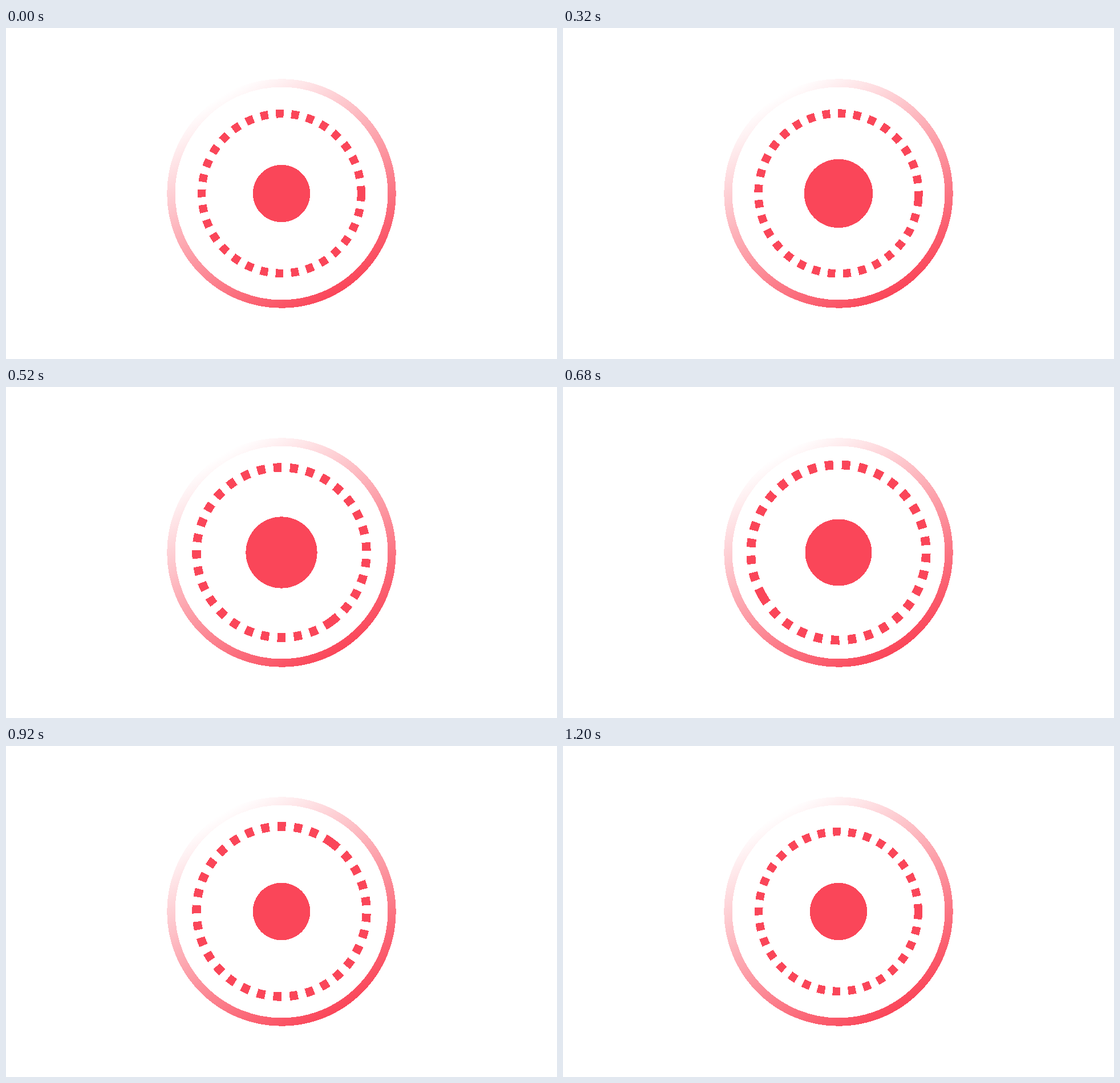
Recreate the animation shown at these times as an HTML page. Size 966 by 580 pixels, loop 6000 ms.

```html
<!DOCTYPE html>
<html lang="en">
<head>
<meta charset="utf-8">
<title>Pulse dial</title>
<style>
  html, body { margin: 0; width: 100%; height: 100%; overflow: hidden; background: #fff; }
  svg { display: block; width: 100%; height: 100%; }
</style>
</head>
<body>
<svg viewBox="0 0 966 580" shape-rendering="crispEdges">
  <defs>
    <linearGradient id="fade" gradientUnits="userSpaceOnUse" x1="-14.4" y1="-24" x2="14.4" y2="24">
      <stop offset="0" stop-color="#fff"/>
      <stop offset="1" stop-color="#fa4659"/>
    </linearGradient>
  </defs>
  <g transform="translate(483 290) scale(7.17)" fill="none" stroke-width="2">
    <circle r="27" stroke="url(#fade)"/>
    <circle id="dashes" r="19.5" stroke="#fa4659" stroke-dasharray="1.885"/>
    <circle id="core" r="7" fill="#fa4659"/>
  </g>
</svg>
<script>
  const LOOP = 6000, STEP = 40, DURATION = 960, DASH_DELAY = 240;
  const dashes = document.getElementById('dashes');
  const core = document.getElementById('core');

  // cubic-bezier(.5, 0, .5, 1), solved with Newton's method
  function ease(x) {
    let t = x;
    for (let i = 0; i < 6; i++) {
      t -= (1.5 * t - 1.5 * t * t + t ** 3 - x) / (1.5 - 3 * t + 3 * t * t);
    }
    return 3 * t * t - 2 * t ** 3;
  }

  const progress = (time, start) => Math.min(1, Math.max(0, (time - start) / DURATION));
  const pulse = (p, amount) => 1 + amount * ease(1 - Math.abs(2 * p - 1));

  function draw(now) {
    const time = Math.floor((now % LOOP) / STEP) * STEP;
    const spin = progress(time, DASH_DELAY);
    core.setAttribute('transform', `scale(${pulse(progress(time, 0), 0.25)})`);
    dashes.setAttribute('transform', `rotate(${360 * ease(spin)}) scale(${pulse(spin, 0.1)})`);
  }

  let start;
  function tick(now) {
    start ??= now;
    draw(now - start);
    requestAnimationFrame(tick);
  }
  draw(0);
  requestAnimationFrame(tick);
</script>
</body>
</html>
```
